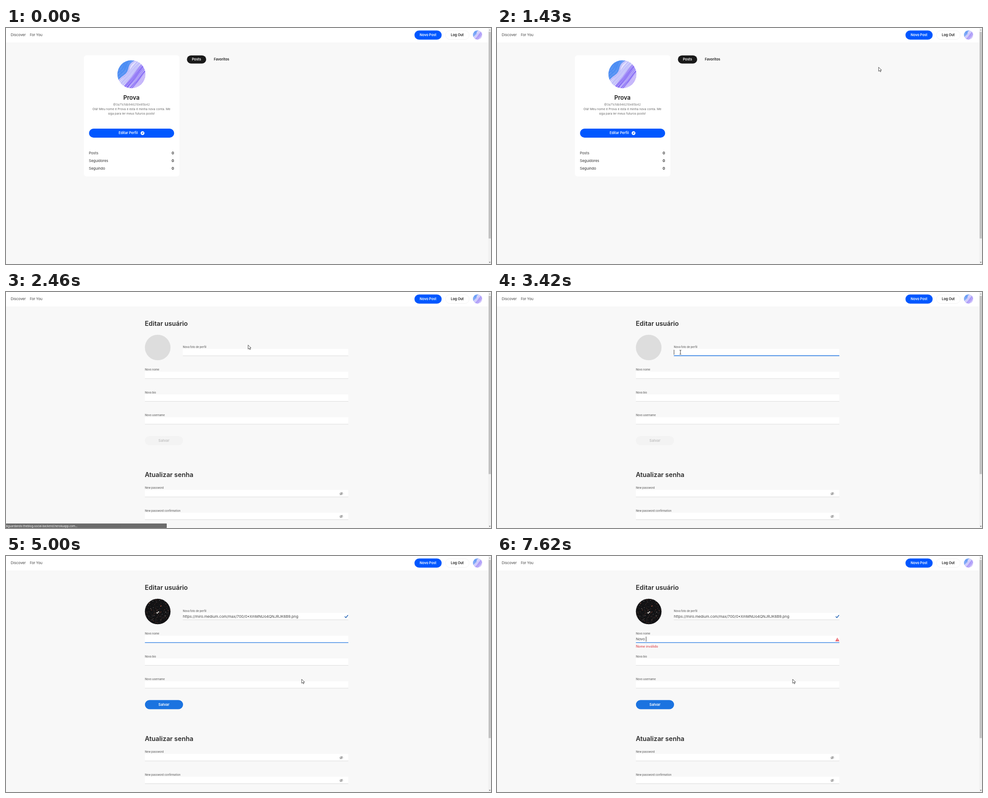
Animation of 1071x523 px, one loop 8000 ms. Source, as an HTML page:

```html
<!DOCTYPE html>
<html lang="pt">
<head>
<meta charset="utf-8">
<title>Editar perfil</title>
<style>
  html, body { margin: 0; width: 100%; height: 100%; overflow: hidden; background: #f8f8f8; }
  svg { display: block; width: 100vw; height: 100vh; }
  text { font-family: Inter, sans-serif; white-space: pre; }
</style>
</head>
<body>
<svg id="stage" viewBox="0 0 1071 523"></svg>
<script>
const LOOP = 8000;
const BLUE = '#0057ff', INK = '#1c1c1c', ACCENT = [27, 115, 224];

let seed = 11;
const random = () => (seed = (seed * 16807) % 2147483647) / 2147483647;

// Markup helpers; text is placed by the middle of its capitals.
const text = (x, cy, str, size, color = INK, weight = 400, extra = '') =>
  `<text x="${x}" y="${cy + size * 0.36}" font-size="${size}" fill="${color}" font-weight="${weight}" ${extra}>${str}</text>`;
const box = (x, y, w, h, fill, r = 0, extra = '') =>
  `<rect x="${x}" y="${y}" width="${w}" height="${h}" fill="${fill}" rx="${r}" ${extra}/>`;
const MIDDLE = 'text-anchor="middle"', END = 'text-anchor="end"';

function stripedAvatar() {
  let lines = '';
  for (let u = -32; u < 32; u += 2) {
    const color = u < -13 ? '#468af3' : u < 3 ? '#b5b4fa' : u < 21 ? '#795af4' : '#b39cf8';
    const wave = u < -8 ? 3.5 : 0.8;
    const width = (u < -13 ? 1.6 : 0.9) + random() * 0.7;
    const drift = random() * 2 - 1;
    lines += `<path d="M-34 ${u + drift}C-14 ${u - wave} -10 ${u + wave * 2} 4 ${u} S20 ${u - wave} 34 ${u - drift}" stroke="${color}" stroke-width="${width}"/>`;
  }
  return `<g id="stripes" clip-path="url(#disc)"><circle r="31" fill="#e5e2fd"/>
    <g transform="rotate(-50)" fill="none">${lines}</g></g>`;
}

function starField() {
  let stars = '';
  const colors = ['#d8d4d0', '#8d7a70', '#a4503e', '#6d6c78', '#c07a62'];
  for (let i = 0; i < 260; i++) {
    const angle = random() * 6.283, dist = 28 * Math.sqrt(random());
    const size = 0.2 + random() ** 3 * 0.6;
    stars += `<circle cx="${Math.cos(angle) * dist}" cy="${Math.sin(angle) * dist}" r="${size}" fill="${colors[i % 5]}"/>`;
  }
  return `<g id="galaxy" transform="translate(335 123)"><circle r="28.3" fill="#121214"/>${stars}
    <circle cx="-1" cy="3" r="2" fill="#ddd5cc" opacity=".8"/><circle cx="2" cy="1" r="1.2" fill="#fff"/>
    <circle cx="7" cy="-12" r="1" fill="#e06a50"/></g>`;
}

const header = box(0, 0, 1065, 32, '#fff') +
  text(10.5, 15.5, 'Discover', 8, '#444') + text(52.7, 15.5, 'For You', 7.7, '#444') +
  box(902, 5.5, 60, 20.3, BLUE, 10.1) + text(932, 15.5, 'Novo Post', 7.5, '#fff', 600, MIDDLE) +
  box(970.5, 5.8, 52.3, 19.7, '#fff', 9.8, 'stroke="#ececec" stroke-width=".7"') +
  text(996.5, 15.5, 'Log Out', 7.5, INK, 600, MIDDLE) +
  '<use href="#stripes" transform="translate(1041.3 15.6) scale(.33)"/>';

const scrollbar = box(1065, 0, 6, 523, '#f1f1f1') + box(1065.7, 8.5, 5, 458, '#c1c1c1', 0, 'id="thumb"') +
  '<path d="M1066.5 5.2l1.7-2 1.7 2z" fill="#888"/><path d="M1066.5 518.5l1.7 2 1.7-2z" fill="#444"/>';

const stat = (cy, label) => text(183, cy, label, 8, '#333') + text(371, cy, '0', 8, INK, 600, END);

const profile = `<g id="profile">${box(172, 60.5, 211, 268.5, '#fff', 6)}
  <use href="#stripes" transform="translate(277 102.5)"/>
  ${text(277, 154.5, 'Prova', 13, INK, 600, MIDDLE)}
  ${text(277, 169.5, '@3a71cfdb946210e85b42', 6.5, '#777', 400, MIDDLE)}
  ${text(277, 179.5, 'Olá! Meu nome é Prova e esta é minha nova conta. Me', 6.7, '#666', 400, MIDDLE)}
  ${text(277, 189.5, 'siga para ler meus futuros posts!', 6.7, '#666', 400, MIDDLE)}
  ${box(183.3, 223, 188, 20, BLUE, 10, 'id="edit"')}
  ${text(248.7, 232.7, 'Editar Perfil', 7.5, '#fff', 600)}
  <circle cx="301.5" cy="233" r="4.2" fill="#fff"/><path d="M299.9 234.7l.4-1.5 2.2-2.1 1 1-2.1 2.2z" fill="#0048d8"/>
  ${stat(277, 'Posts')}${stat(294.3, 'Seguidores')}${stat(311.6, 'Seguindo')}
  ${box(399.5, 60.7, 42.5, 18, '#1a1a1a', 9)}${text(420.7, 69.5, 'Posts', 7.6, '#fff', 600, MIDDLE)}
  ${text(459, 69.5, 'Favoritos', 7.6, INK, 600)}</g>`;

const field = (x, top, label, id) => text(x, top - 4.6, label, 5.85, '#666', 500) +
  box(x, top, 756 - x, 15.5, '#fff') +
  `<path id="${id}" d="M${x} ${top + 15.3}H756" stroke="#dadada"/>`;
const eye = cy => `<g transform="translate(740.3 ${cy})" fill="none" stroke="#666" stroke-width=".7">
  <path d="M-3.8 0Q0-5 3.8 0Q0 5-3.8 0zM-3 3.3L3-3.3"/><circle r="1.3"/></g>`;
const tick = (id, cy) => `<path id="${id}" d="M748 ${cy}l2.6 2.7 4.6-5.6" fill="none" stroke="#1459b0" stroke-width="1.5"/>`;

const form = `<g id="form">${text(306.5, 69.5, 'Editar usuário', 14.2, '#2b2b2b', 600)}
  <circle cx="335" cy="123" r="28.3" fill="#ddd"/>${starField()}
  ${field(390.5, 126, 'Nova foto de perfil', 'photoLine')}
  ${field(306.7, 176.6, 'Novo nome', 'nameLine')}
  ${field(306.7, 227.1, 'Nova bio', 'bioLine')}
  ${field(306.7, 277.6, 'Novo username', 'userLine')}
  ${box(306.8, 319.3, 84.2, 20.2, '#f3f3f3', 10.1, 'id="save"')}
  ${text(348.7, 329.3, 'Salvar', 8, '#c0c0c0', 600, MIDDLE + ' id="saveText"')}
  ${text(306.5, 404.5, 'Atualizar senha', 14.3, '#2b2b2b', 600)}
  ${field(306.7, 438.8, 'New password', 'passLine')}${eye(447)}
  ${field(306.7, 489.2, 'New password confirmation', 'confirmLine')}${eye(497.4)}
  ${text(390.5, 133.7, '', 8.2, '#444', 400, 'id="url"')}${text(306.7, 184.2, '', 8, '#444', 400, 'id="name"')}
  ${tick('urlTick', 134)}${tick('nameTick', 184.5)}
  <g id="error"><path d="M751.5 181.4l4 7.3h-8z" fill="#ea5a64" stroke="#ea5a64" stroke-linejoin="round" stroke-width=".6"/>
    <path d="M751.5 183.6v2.3m0 .8v.9" stroke="#fff" stroke-width=".9"/>
    ${text(306.7, 200.3, 'Nome inválido', 7.2, '#dc4a52', 500)}</g>
  ${box(0, 0, 0.9, 11, '#222', 0, 'id="caret"')}</g>`;

const status = `<g id="status">${box(0, 513, 355, 10, '#000', 1)}
  <text x="0" y="521.3" font-size="6.2" fill="#fff" style="font-family:'Noto Sans',sans-serif">Aguardando theblog-social-backend.herokuapp.com...</text></g>`;

const cursors = `<path id="arrow" d="M.4 .5V9.6L2.6 7.6L4.1 10.8L5.6 10.1L4.2 7H6.9z" fill="#fff" stroke="#222" stroke-width=".8"/>
  <path id="beam" d="M-2-4.7Q0-4.7 0-3.8Q0-4.7 2-4.7M0-4V4M-2 4.7Q0 4.7 0 3.8Q0 4.7 2 4.7" fill="none" stroke="#222" stroke-width=".9"/>
  <path id="hand" d="M-.7 0Q.4-.8 1 .2V4L4.8 4.8Q5.6 5.2 5.3 6.6L4.6 10H0L-2.8 6Q-2.6 4.8-.9 6z" fill="#fff" stroke="#222" stroke-width=".7"/>`;

document.getElementById('stage').innerHTML =
  `<defs><clipPath id="disc"><circle r="31"/></clipPath>${stripedAvatar()}</defs>` +
  box(0, 0, 1071, 523, '#f8f8f8') + header + profile + form + scrollbar + status + cursors;

const $ = id => document.getElementById(id);
const show = (id, on) => $(id).style.display = on ? '' : 'none';
const ramp = (t, from, to) => Math.min(1, Math.max(0, (t - from) / (to - from)));
const mix = (a, b, k) => `rgb(${a.map((v, i) => Math.round(v + (b[i] - v) * k))})`;
const latest = (steps, t) => steps.reduce((value, [at, next]) => t >= at ? next : value, '');

// Pointer path: time, x, y
const path = [
  [70, 560, 497], [250, 300, 330], [450, 600, 80], [650, 974, 200], [820, 760, 150],
  [1000, 640, 65], [1150, 680, 50], [1300, 780, 62], [1430, 843.5, 86], [1500, 760, 112],
  [1570, 560, 165], [1640, 365, 212], [1710, 362, 226], [1850, 368, 231], [1980, 368, 231],
  [2130, 478, 244], [2300, 560, 170], [2460, 534.5, 117], [2800, 448, 125], [2860, 448, 126],
  [2870, 449, 131], [3200, 449, 131], [3350, 405, 133.5], [4200, 405, 133.5], [4340, 388, 184],
  [4560, 388, 184], [4730, 652.5, 272.5], [8000, 652.5, 272.5]
];
const shapes = [[70, 'arrow'], [1700, 'hand'], [2000, 'beam'], [2200, 'arrow'], [2865, 'beam'], [4600, 'arrow']];
const nameTyping = [[5530, 'N'], [6010, 'No'], [6270, 'Nom'], [6670, 'Nome'], [7000, 'Nom'],
  [7140, 'No'], [7210, 'Nov'], [7350, 'Novo'], [7550, 'Novo ']];

function drawPointer(t) {
  const kind = latest(shapes, t);
  for (const id of ['arrow', 'beam', 'hand']) show(id, id === kind);
  if (!kind) return;
  const i = path.findIndex(p => p[0] > t);
  const [t0, x0, y0] = path[i - 1], [t1, x1, y1] = path[i];
  const k = (t - t0) / (t1 - t0);
  $(kind).setAttribute('transform', `translate(${x0 + (x1 - x0) * k} ${y0 + (y1 - y0) * k})`);
}

function drawLine(id, t, focus, blur) {
  const on = t >= focus && t < blur;
  $(id).setAttribute('stroke', on ? mix([60, 90, 140], ACCENT, ramp(t, focus, focus + 70)) : '#dadada');
  $(id).setAttribute('stroke-width', on ? 1.4 : 1);
}

function drawForm(t) {
  const pasted = t >= 3570, save = ramp(t, 3600, 3760);
  $('url').textContent = pasted ? 'https://miro.medium.com/max/700/0*XmMNUo4QNJRJK6B9.png' : '';
  $('name').textContent = latest(nameTyping, t);
  $('save').setAttribute('fill', mix([243, 243, 243], ACCENT, save));
  $('saveText').setAttribute('fill', mix([192, 192, 192], [255, 255, 255], save));
  show('galaxy', t >= 3880);
  show('urlTick', t >= 3640);
  show('nameTick', t >= 5600 && t < 7620);
  show('error', t >= 7620);
  drawLine('photoLine', t, 3350, 4370);
  drawLine('nameLine', t, 4370, LOOP);

  const active = t < 4370 ? 'url' : 'name';
  const x = +$(active).getAttribute('x') + $(active).getComputedTextLength();
  $('caret').setAttribute('x', x);
  $('caret').setAttribute('y', active === 'url' ? 128 : 178.7);
  show('caret', t >= 3350 && !(t >= 5000 && t < 5530));
}

function draw() {
  const t = performance.now() % LOOP;
  const editing = t >= 2270;
  show('profile', !editing);
  show('form', editing);
  $('thumb').setAttribute('height', editing ? 395 : 458);
  $('edit').setAttribute('fill', mix([0, 87, 255], [0, 62, 205], ramp(t, 1700, 1850)));
  $('status').setAttribute('opacity', t < 2060 ? 0 : 1 - ramp(t, 2400, 2540));
  if (editing) drawForm(t);
  drawPointer(t);
  requestAnimationFrame(draw);
}
draw();
</script>
</body>
</html>
```
